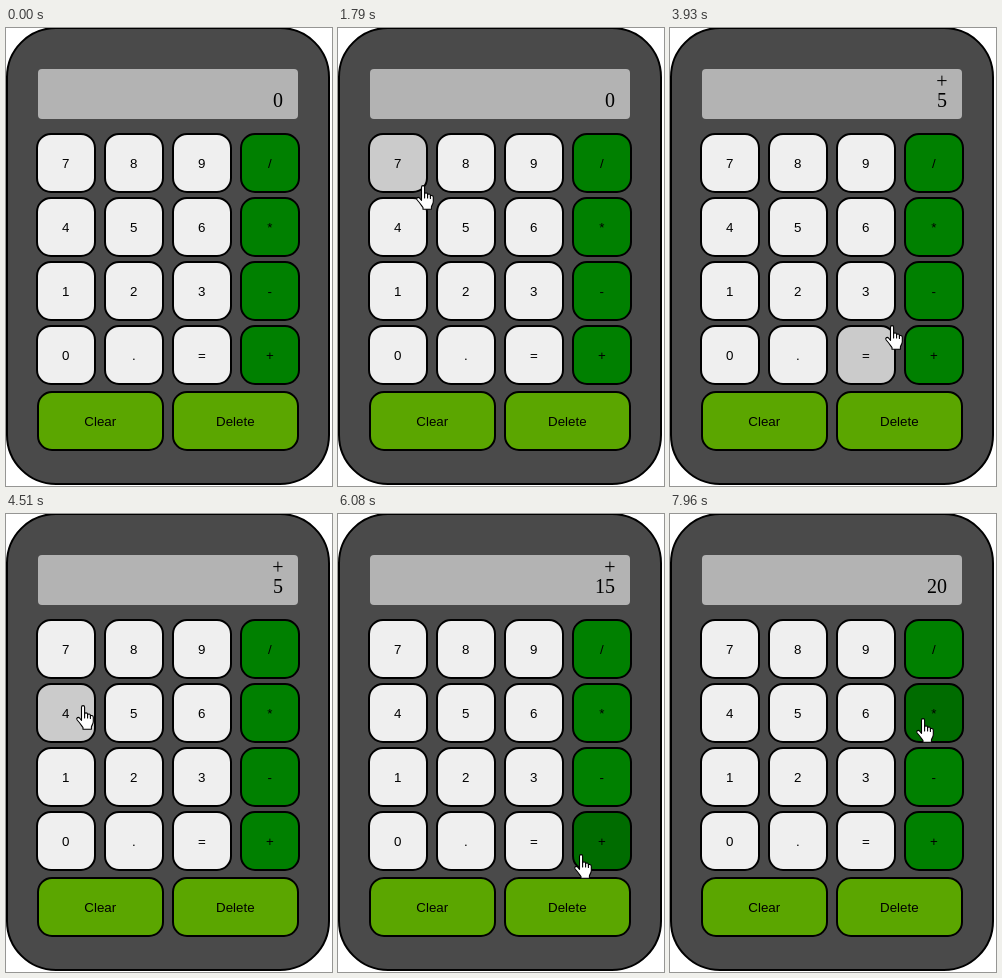
These frames come from a looping animation (326 px wide and 458 px high, 8 s). An HTML page:

```html
<!DOCTYPE html>
<html lang="en">
<head>
<meta charset="utf-8">
<title>Calculator</title>
<style>
  html, body { margin: 0; width: 100%; height: 100%; overflow: hidden; background: #fff; }
  svg { display: block; }
  text { fill: #000; }
  .key text { font: 13.333px Arial, "Liberation Sans", sans-serif; text-anchor: middle; }
  .out { font: 20px "Times New Roman", "Liberation Serif", serif; text-anchor: end; }
  .key rect { stroke: #000; stroke-width: 2; fill: var(--base); }
  .key.hot rect { fill: var(--hot); }
  .key.down { opacity: .7; }
</style>
</head>
<body>
<svg id="stage" width="326" height="458" viewBox="0 0 326 458">
  <rect x="1" y="0" width="322" height="456" rx="49" fill="#4a4a4a" stroke="#000" stroke-width="2"/>
  <rect x="32" y="41" width="260" height="50" rx="4" fill="#b3b3b3"/>
  <text id="op" class="out" x="277.5" y="60"></text>
  <text id="num" class="out" x="277" y="79">0</text>
  <g id="keys"></g>
  <g id="hand" stroke="#000" stroke-width="1.1" stroke-linejoin="round" stroke-linecap="round">
    <path fill="#fff" d="M5.5 15.3V2.3C5.5 .1 8.6 .1 8.6 2.3V9C8.7 7.4 11.5 7.5 11.6 9.2V10C11.8 8.6 14.3 8.8 14.4 10.4V11.2C14.8 10 17.3 10.2 17.3 12.2V16.5C17.3 19 15.6 20.5 15.4 22V24.3H7V22.5C5.5 20.5 3.5 17.5 1.2 15C-.2 13.2 2 11.4 3.5 13Z"/>
    <path fill="none" d="M8.6 9V13M11.6 9.6V13M14.4 10.8V13.4"/>
  </g>
</svg>
<script>
const NS = 'http://www.w3.org/2000/svg';
const LOOP = 8000;
const TIP = 7;
const $ = id => document.getElementById(id);

const LIGHT = ['#efefef', '#cbcbcb'];
const GREEN = ['#008000', '#006c00'];
const LIME = ['#5ba600', '#4d8d00'];

function add(parent, tag, attrs) {
  const el = document.createElementNS(NS, tag);
  for (const k in attrs) el.setAttribute(k, attrs[k]);
  return parent.appendChild(el);
}

const keys = [];
function addKey(label, x, y, w, [base, hot]) {
  const g = add($('keys'), 'g', { class: 'key', style: `--base:${base};--hot:${hot}` });
  add(g, 'rect', { x: x + 1, y: y + 1, width: w - 2, height: 58, rx: 14 });
  add(g, 'text', { x: x + w / 2 - 0.2, y: y + 35 }).textContent = label;
  keys.push({ label, x, y, w, g });
}
['789/', '456*', '123-', '0.=+'].forEach((row, r) =>
  [...row].forEach((ch, c) =>
    addKey(ch, 30 + 68 * c, 105 + 64 * r, 60, c === 3 ? GREEN : LIGHT)));
addKey('Clear', 31, 363, 127, LIME);
addKey('Delete', 166, 363, 127, LIME);

const line = p => p;
const soft = p => p * p * (3 - 2 * p);
const out = p => 1 - (1 - p) * (1 - p);
const into = p => p * p;

// time, x, y, easing towards this stop
const path = [
  [1200, 294, 280, line],
  [1680, 75, 154, out],
  [1790, 78, 157, soft],
  [1990, 118, 185, line],
  [2070, 125, 193, out],
  [2690, 125, 193, line],
  [3150, 242, 315, soft],
  [3280, 250, 323, out],
  [3800, 250, 323, line],
  [4270, 64, 186, soft],
  [4420, 64, 186, line],
  [4510, 70, 191, into],
  [4790, 62, 258, out],
  [5060, 62, 258, line],
  [5210, 98, 224, into],
  [5370, 122, 198, out],
  [5590, 122, 198, line],
  [6030, 240, 341, soft],
  [6250, 207, 332, soft],
  [7120, 207, 332, line],
  [7550, 260, 225, soft],
  [7760, 260, 225, line],
  [7960, 246, 204, soft]
];

// press, release, key, number shown, operator shown
const clicks = [
  [2530, 2620, '5', '5', ''],
  [3400, 3490, '+', '5', '+'],
  [4850, 4930, '1', '1', '+'],
  [5430, 5510, '5', '15', '+'],
  [6440, 6500, '=', '20', '']
];

function handAt(t) {
  if (t < path[0][0]) return null;
  const i = path.findIndex(s => s[0] > t);
  if (i < 0) return path[path.length - 1].slice(1, 3);
  const a = path[i - 1], b = path[i];
  const p = b[3]((t - a[0]) / (b[0] - a[0]));
  return [1, 2].map(k => Math.round(a[k] + (b[k] - a[k]) * p));
}

function draw(t) {
  const pos = handAt(t);
  $('hand').style.display = pos ? '' : 'none';
  if (pos) $('hand').setAttribute('transform', `translate(${pos})`);

  const held = clicks.find(c => t >= c[0] && t < c[1]);
  for (const k of keys) {
    const dx = pos ? pos[0] + TIP - k.x : -1;
    const dy = pos ? pos[1] - k.y : -1;
    k.g.classList.toggle('hot', dx >= 0 && dx < k.w && dy >= 0 && dy < 60);
    k.g.classList.toggle('down', !!held && held[2] === k.label);
  }

  const done = clicks.filter(c => t >= c[1]).pop();
  $('num').textContent = done ? done[3] : '0';
  $('op').textContent = done ? done[4] : '';
}

function tick() {
  draw(performance.now() % LOOP);
  requestAnimationFrame(tick);
}
tick();
</script>
</body>
</html>
```
